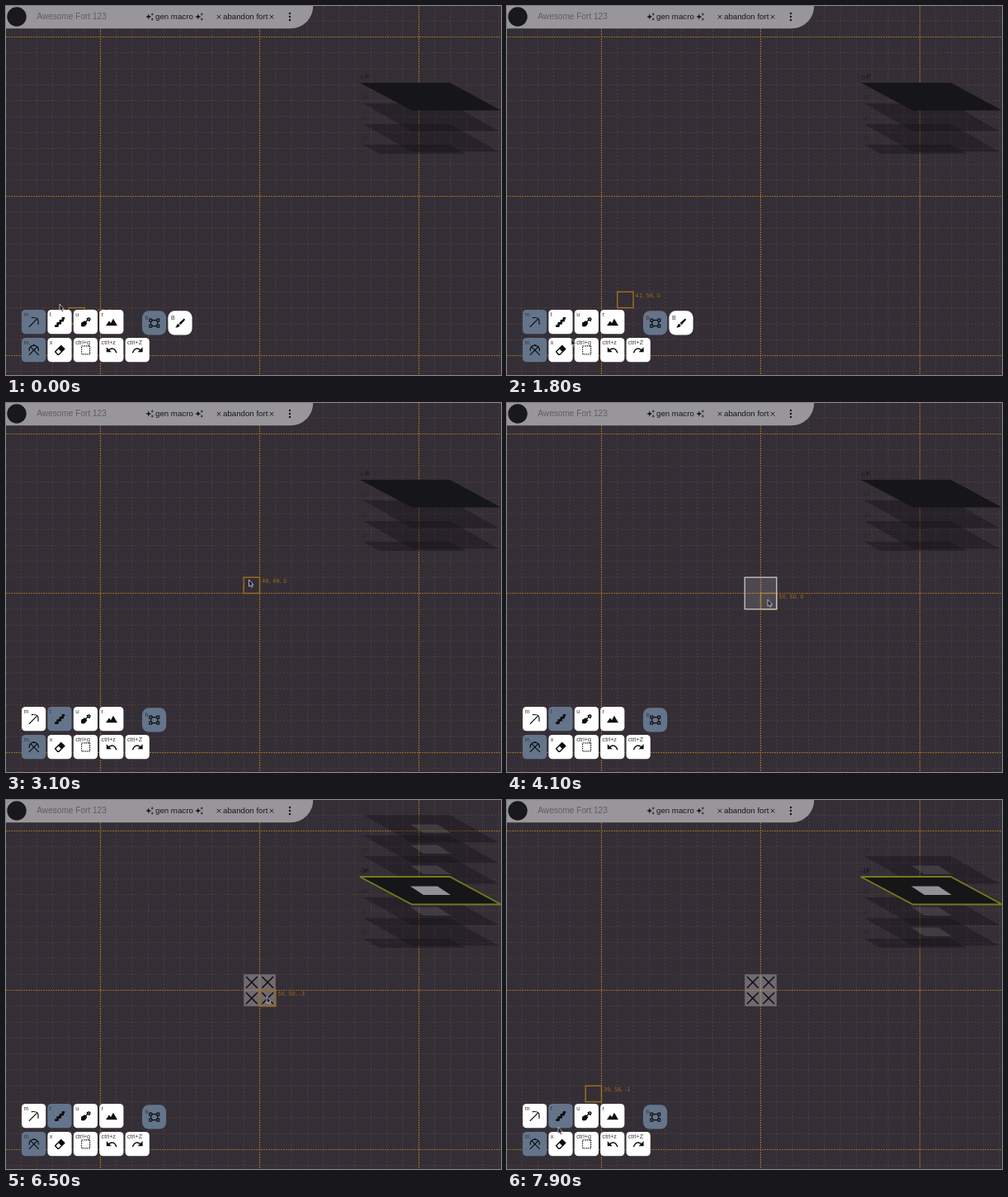
These frames come from a looping animation (600x447 px, 8 s). An HTML page:

```html
<!DOCTYPE html>
<html lang="en">
<head>
<meta charset="utf-8">
<title>Fort planner</title>
<style>
  html, body { margin: 0; width: 100%; height: 100%; overflow: hidden; background: #342e36; }
  svg { display: block; width: 600px; height: 447px; }
  text { font-family: "Liberation Sans", Arial, sans-serif; white-space: pre; }
  .minor { stroke: #76522c; stroke-width: .8; stroke-dasharray: 2 2.2; opacity: .68; }
  .major { stroke: #9a6d22; stroke-width: 1.2; stroke-dasharray: 2 1; }
  .key { font-size: 7.2px; fill: #38383c; }
  .icon { fill: none; stroke: #0c0c0e; stroke-width: 1.4; stroke-linejoin: round; }
  .icon .solid { fill: #0c0c0e; stroke: none; }
  .coords { font: 6.8px "DejaVu Sans", sans-serif; fill: #9a6a20; }
  .level { font-size: 8px; fill: #0d0c0e; }
</style>
</head>
<body>
<svg id="stage" viewBox="0 0 600 447">
  <defs><clipPath id="stackClip"><rect x="420" y="5" width="180" height="174"/></clipPath></defs>
  <rect width="600" height="447" fill="#342e36"/>
  <g id="grid"></g>
  <g id="tiles"></g>
  <g id="hover">
    <rect width="19.3" height="19.3" fill="none" stroke="#a06f1f" stroke-width="1.4"/>
    <text id="coords" class="coords" x="21.8" y="6.6"></text>
  </g>
  <rect id="selection" fill="#fff" fill-opacity=".13" stroke="#c9c6c8" stroke-width="1.3"/>
  <g id="stack" clip-path="url(#stackClip)"></g>
  <g id="header"></g>
  <g id="tools"></g>
  <path id="cursor" d="M0 0V8.2L1.8 6.7L3 9.3L4.4 8.7L3.3 6.1H5.4Z" fill="#1c1a1e" stroke="#d6d4d6" stroke-width=".8"/>
</svg>
<script>
const LOOP = 8000, TICK = 100, CELL = 19.3, MID_X = 307.5, MID_Y = 230.5;
const $ = id => document.getElementById(id);
const colX = c => MID_X + (c - 50) * CELL;
const rowY = r => MID_Y + (r - 50) * CELL;
const range = (a, b) => Array.from({ length: b - a + 1 }, (_, i) => a + i);

// [time, x, y]
const cursorTrack = [
  [0, 65, 361], [900, 295.5, 218], [1000, 295.5, 218], [1100, 296.5, 218], [1200, 296.5, 218],
  [1800, 78, 403], [1900, 61, 414], [2000, 47, 416], [2100, 71, 392], [2200, 72, 392],
  [3000, 72, 392], [3100, 294.5, 214], [3500, 294.5, 214], [4100, 316, 238],
  [7400, 316, 238], [7900, 62, 396]
];
// [time, column, row]
const cellTrack = [
  [0, 38, 57], [900, 49, 49], [1200, 49, 49], [1600, 41, 56], [3000, 41, 56], [3100, 49, 49],
  [3600, 49, 49], [4000, 50, 50], [7400, 50, 50], [7800, 39, 56]
];
const levels = [[0, 0], [4700, -1], [5000, -2], [5300, -3], [5600, -4], [6500, -3], [6700, -2], [7000, -1]];
const PICK_STAIRS = 2400, DRAG = 3600, PLACE = 6000, DEEPEST = -4;

function sample(track, t) {
  const i = track.findIndex(k => k[0] > t);
  if (i < 0) return track[track.length - 1].slice(1);
  const [t0, x0, y0] = track[i - 1], [t1, x1, y1] = track[i];
  const u = (t - t0) / (t1 - t0), s = u * u * (3 - 2 * u);
  return [x0 + (x1 - x0) * s, y0 + (y1 - y0) * s];
}
const levelAt = t => levels.filter(k => k[0] <= t).pop()[1];

function buildGrid() {
  const line = (i, d) => `<path class="${i % 10 ? 'minor' : 'major'}" d="${d}"/>`;
  $('grid').innerHTML =
    range(35, 65).map(c => line(c, `M${colX(c)} 0V447`)).join('') +
    range(39, 61).map(r => line(r, `M0 ${rowY(r)}H600`)).join('');
}

function buildHeader() {
  const star = (x, y, r) => {
    const q = r * .25;
    return `<path d="M${x} ${y - r}l${q} ${r - q}l${r - q} ${q}l${q - r} ${q}l${-q} ${r - q}l${-q} ${q - r}l${q - r} ${-q}l${r - q} ${-q}Z"/>`;
  };
  const sparkle = x => star(x - 1.2, 13, 3.6) + star(x + 3.2, 10, 1.9) + star(x + 3.2, 16, 1.9);
  const cross = x => `<path d="M${x - 2.3} 10.9l4.6 4.6m0 -4.6l-4.6 4.6" stroke="#151517" stroke-width=".9"/>`;
  $('header').innerHTML = `
    <path d="M0 0H372.3A27.3 27.3 0 0 1 345 27.3H0Z" fill="#98969a"/>
    <circle cx="13" cy="13" r="11.7" fill="#19191b"/>
    <text x="37.3" y="16.4" font-size="10.1" fill="#5f5d62">Awesome Fort 123</text>
    <g fill="#151517" font-size="9.7">
      ${sparkle(174)}<text x="181" y="16.4">gen macro</text>${sparkle(234)}
      ${cross(258)}<text x="263" y="16.4">abandon fort</text>${cross(322)}
      ${[9, 13, 17].map(y => `<circle cx="344" cy="${y}" r="1.2"/>`).join('')}
    </g>`;
}

// Icons are drawn around 0,0
const icons = {
  pick: '<path stroke-width="1.2" d="M-6 6L3.5 -3.5M-3 -5.2Q3 -5.6 4 -4Q5.6 -3 5.2 3"/>',
  stairs: '<path stroke-width="2.6" d="M-6 4.8H-2.6V1.6H.6V-1.6H3.6V-4.6H6"/>',
  shovel: '<path class="solid" d="M-5.5 1L-1 -1.5L1.8 1.4L-.6 5Q-4 6.6 -5.6 4.8Z"/><path d="M-1 1L3 -3M1.6 -4.2L4.2 -5L5.4 -3.6L4.4 -1.2Z"/>',
  ramp: '<path class="solid" d="M-7 4.4L-3 -1.4L-1 1.4L2 -4L7 4.4Z"/>',
  area: '<path stroke-width="1.1" d="M-3 -3.5H3M-3 3.5H3M-4 -2V2M4 -2V2M-6 -5h3v3h-3zM3 -5h3v3h-3zM-6 2h3v3h-3zM3 2h3v3h-3z"/>',
  brush: '<path class="solid" d="M4.6 -5.6L6 -4.2L.4 2.2L-1.6 .2ZM-2.4 1L-.4 3Q-1.6 6 -6 5.2Q-4.4 4.2 -4.4 2.6Q-3.6 1 -2.4 1Z"/>',
  crossed: '<path stroke-width="1.2" d="M-6 6L4 -4M6 6L-4 -4M-1 -5.6Q3 -5.8 4 -4Q5.8 -3 5.6 1M1 -5.6Q-3 -5.8 -4 -4Q-5.8 -3 -5.6 1"/>',
  eraser: '<path d="M-5.6 2L1.6 -5.2L5.6 -1.4L-1.2 5.4H-2.6Z"/><path class="solid" d="M-2 -1.6L1.6 -5.2L5.6 -1.4L2 2.2Z"/>',
  marquee: '<rect x="-5" y="-5" width="10" height="10" stroke-dasharray="1.4 1.1" stroke-width="1.2"/>',
  undo: '<path d="M-4 .2Q2.6 -5 6 3.4"/><path class="solid" d="M-6.2 -3.6V2.4H-.2Z"/>',
  redo: '<path d="M4 .2Q-2.6 -5 -6 3.4"/><path class="solid" d="M6.2 -3.6V2.4H.2Z"/>'
};
const buttons = [
  ['pick', 'm', 19, 368], ['stairs', 't', 50.4, 368], ['shovel', 'u', 81.8, 368], ['ramp', 'r', 113.2, 368],
  ['area', 'b', 165, 369.3, 8], ['brush', 'B', 196.4, 369.3, 8],
  ['crossed', 'm,', 19, 402], ['eraser', 'x', 50.4, 402], ['marquee', 'ctrl+g', 81.8, 402],
  ['undo', 'ctrl+z', 113.2, 402], ['redo', 'ctrl+Z', 144.6, 402]
];
const button = name => $('tool-' + name);
function buildTools() {
  $('tools').innerHTML = buttons.map(([name, key, x, y, r = 4.5]) => `
    <g id="tool-${name}" transform="translate(${x} ${y})">
      <rect width="29.2" height="29.2" rx="${r}"/>
      <text class="key" x="${r > 5 ? 3.6 : 2.4}" y="${r > 5 ? 10.4 : 8.4}">${key}</text>
      <g class="icon" transform="translate(14.8 14.8)">${icons[name]}</g>
    </g>`).join('');
}

function drawStack(z, placed) {
  const layer = k => {
    const level = z - k, main = k === 0, dug = placed && level >= DEEPEST;
    const edge = main && dug ? 'stroke="#727b1e" stroke-width="1.8"' : '';
    const fill = main ? '#161517' : 'rgba(18,16,20,.36)';
    return `<g transform="translate(0 ${25 * k})">
      <path d="${main ? 'M429 93H538L600 126.5H492Z' : 'M433 93H538L597 126.5H492Z'}" fill="${fill}" ${edge}/>
      ${dug ? `<path d="M490 104.5H523L539 115H506Z" fill="#929094" opacity="${main ? 1 : .22}"/>` : ''}
      <text class="level" x="428.5" y="87.5" opacity="${main ? .9 : .25}">${level === 0 ? '☼' : level}F</text>
    </g>`;
  };
  $('stack').innerHTML = range(z, 3).sort((a, b) => Math.abs(b) - Math.abs(a)).map(layer).join('');
}

function drawTiles(z, placed) {
  if (!placed) return '';
  const glyph = z === DEEPEST ? 'M16.4 3L3.2 9.6L16.4 16.4' : 'M2.8 2.8L16.5 16.5M16.5 2.8L2.8 16.5';
  return `<rect x="${colX(49)}" y="${rowY(49)}" width="${2 * CELL}" height="${2 * CELL}" fill="#b5b1b5" opacity=".45"/>` +
    range(0, 3).map(i => `<path transform="translate(${colX(49 + i % 2)} ${rowY(49 + (i >> 1))})"
      d="${glyph}" fill="none" stroke="#100f11" stroke-width="1.6"/>`).join('');
}

const setAttrs = (el, attrs) => Object.entries(attrs).forEach(([k, v]) => el.setAttribute(k, v));
let lastTick = -1;
function draw(t) {
  const tick = Math.floor(t / TICK) * TICK;
  if (tick === lastTick) return;
  lastTick = tick;

  const z = levelAt(tick), placed = tick >= PLACE, stairsTool = tick >= PICK_STAIRS;
  const [x, y] = sample(cursorTrack, tick);
  const [col, row] = sample(cellTrack, tick).map(Math.round);
  setAttrs($('cursor'), { transform: `translate(${x} ${y})` });
  setAttrs($('hover'), { transform: `translate(${colX(col)} ${rowY(row)})` });
  $('coords').textContent = `${col}, ${row}, ${z}`;

  const dragging = tick >= DRAG && !placed;
  setAttrs($('selection'), {
    x: colX(49), y: rowY(49),
    width: Math.max(1, col - 48) * CELL, height: Math.max(1, row - 48) * CELL,
    visibility: dragging ? 'visible' : 'hidden'
  });
  drawStack(z, placed);
  $('tiles').innerHTML = drawTiles(z, placed);

  const active = [stairsTool ? 'stairs' : 'pick', 'area', 'crossed'];
  buttons.forEach(([name]) =>
    setAttrs(button(name).firstElementChild, { fill: active.includes(name) ? '#64748b' : '#fff' }));
  setAttrs(button('brush'), { visibility: stairsTool ? 'hidden' : 'visible' });
}

buildGrid();
buildHeader();
buildTools();
const start = performance.now();
function loop() {
  draw((performance.now() - start) % LOOP);
  requestAnimationFrame(loop);
}
loop();
</script>
</body>
</html>
```
